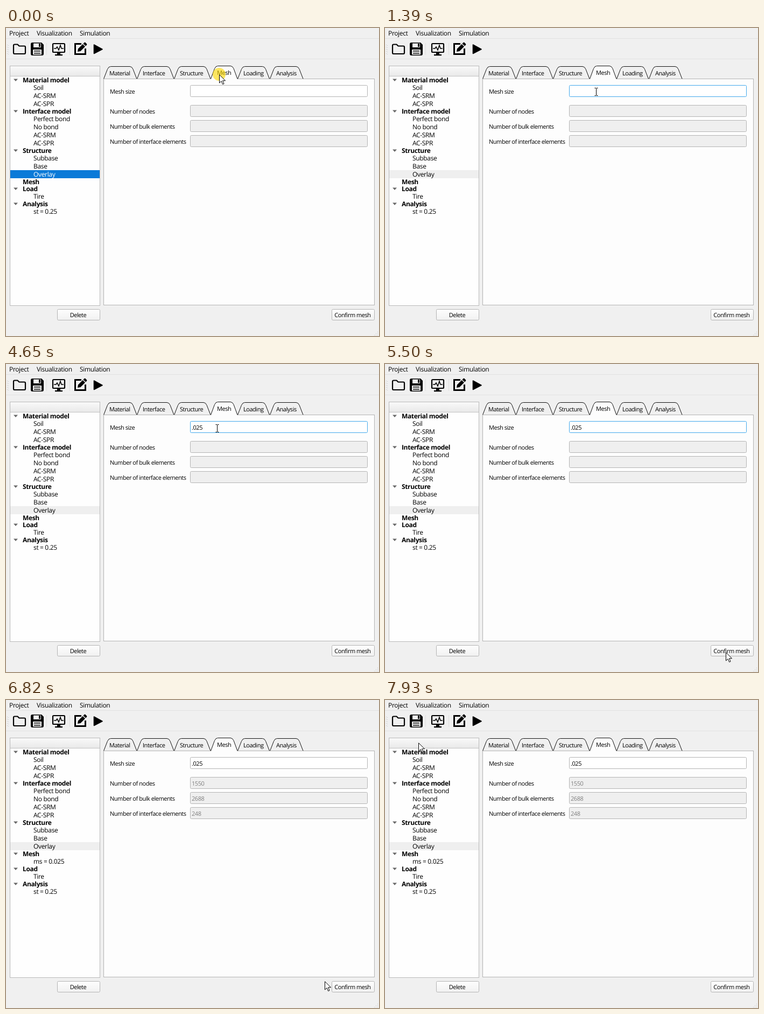
Write an HTML page that moves like this. It is 693x572 px and loops after 8 s.

```html
<!DOCTYPE html>
<html lang="en">
<head>
<meta charset="utf-8">
<title>Mesh settings</title>
<style>
  html, body { margin: 0; width: 100%; height: 100%; overflow: hidden; background: #f0f0f0; }
  svg { display: block; }
  text { font: 12px "Open Sans", "Noto Sans", sans-serif; letter-spacing: -.34px; text-rendering: geometricPrecision; white-space: pre; }
  .bold { font-weight: 700; letter-spacing: -.36px; }
  .form { font-size: 11px; letter-spacing: -.46px; }
  .mid { text-anchor: middle; }
  .off { fill: #808080; }
</style>
</head>
<body>
<svg id="stage" width="693" height="572" viewBox="0 0 693 572">
  <defs>
    <linearGradient id="face" x2="0" y2="1"><stop stop-color="#fefefe"/><stop offset="1" stop-color="#f1f1f1"/></linearGradient>
    <linearGradient id="head" x2="0" y2="1"><stop stop-color="#f9f9f9"/><stop offset="1" stop-color="#e9e9e9"/></linearGradient>
  </defs>
  <rect width="693" height="572" fill="#f0f0f0"/>
  <path d="M0 19.5H693M0 57.5H693" stroke="#e2e2e2"/>
  <path d="M75.5 28V50M118.5 28V50" stroke="#dedede"/>
  <path d="M2.5 31V49M4.5 32V50" stroke="#c4c4c4" stroke-dasharray="1 3"/>
  <path d="M684 570.5h7M687 567.5h4M690 564.5h1" stroke="#c6c6c6" stroke-dasharray="1 2"/>

  <g id="icons">
    <path d="M14 46V32.500Q14 30.500 16 30.500H21.500L24.500 33.500H34Q36 33.500 36 35.500V46Q36 48 34 48H16Q14 48 14 46Z" fill="none" stroke="#000" stroke-width="2.200"/>
    <path fill-rule="evenodd" d="M49 27H66L70 31V48Q70 51 67 51H49Q46 51 46 48V30Q46 27 49 27ZM51 28.500V36H65V28.500ZM50 40V49.500H66V40Z"/>
    <path d="M61 29h3v6h-3zM52 42h12v1.500H52zM52 46h12v1.500H52z"/>
    <rect x="87" y="29" width="22" height="16" rx="1.500" fill="none" stroke="#000" stroke-width="2.200"/>
    <path d="M95 46h6v3h4v2.200H91V49h4z"/>
    <path d="M89 38h4l2-3 3 6 3-9 2 6h4" fill="none" stroke="#000" stroke-width="1.600"/>
    <path d="M140 29.500H128.500V48.500H147.500V38" fill="none" stroke="#000" stroke-width="3"/>
    <path d="M133 44l1-5.500 8.500-8.500 4.500 4.500-8.500 8.500zM143.500 29l2-2q1-.8 2 0l2.500 2.500q.8 1 0 2l-2 2z"/>
    <path d="M163.500 31L179 39.500 163.500 47.500Z" stroke="#000" stroke-width="1.600" stroke-linejoin="round"/>
  </g>

  <rect x="7.500" y="70.500" width="167" height="445" fill="#fefefe" stroke="#b9b9b9"/>
  <rect x="8" y="71" width="166" height="18" fill="url(#head)"/>
  <path d="M8 89.500H174" stroke="#c2c2c2"/>
  <rect id="selection" x="8" y="264" width="166" height="15"/>
  <g id="tree"></g>
  <rect x="181.500" y="94.500" width="503" height="420" fill="#fdfdfd" stroke="#b3b3b3"/>
  <g id="form"></g>
  <rect id="caret" y="111" width="1" height="13"/>
  <circle id="halo" r="12" fill="#fbd800" fill-opacity=".62"/>
  <path id="arrow" d="M.5.8V16L4.100 12.700 6.600 18.500 9 17.500 6.500 11.800H11.500Z" fill="#fff" stroke="#000"/>
  <path id="beam" d="M-3 -6.500H-.5M.5 -6.500H3M0 -6V7M-3 7.500H-.5M.5 7.500H3" fill="none" stroke="#000"/>
</svg>
<script>
const LOOP = 8000, FOCUS = 850, CONFIRM = 5660, RESULT = 5890;
const $ = id => document.getElementById(id);

function add(parent, tag, attrs, content = "") {
  const el = document.createElementNS("http://www.w3.org/2000/svg", tag);
  for (const key in attrs) el.setAttribute(key, attrs[key]);
  el.textContent = content;
  return parent.appendChild(el);
}
const write = (parent, x, y, content, style = "") => add(parent, "text", { x, y, class: style }, content);
const show = (el, on) => el.setAttribute("visibility", on ? "visible" : "hidden");
const place = (el, x, y) => el.setAttribute("transform", `translate(${x} ${y})`);

// Menu bar
[[6, "Project"], [57, "Visualization"], [137, "Simulation"]]
  .forEach(([x, name]) => write($("stage"), x, 14, name));

// Model tree
const tree = $("tree");
function branch(parent, y, name, open = true) {
  write(parent, 31, y, name, "bold");
  return open && twist(parent, y);
}
const twist = (parent, y) => add(parent, "path", { d: `M14 ${y - 6.5}h8l-4 4.500z`, fill: "#686868" });
const leaf = (parent, y, name) => write(parent, 51, y, name);

branch(tree, 101, "Material model");
["Soil", "AC-SRM", "AC-SPR"].forEach((name, i) => leaf(tree, 115 + i * 15, name));
branch(tree, 159, "Interface model");
["Perfect bond", "No bond", "AC-SRM", "AC-SPR"].forEach((name, i) => leaf(tree, 173 + i * 15, name));
branch(tree, 232, "Structure");
const [, , overlay] = ["Subbase", "Base", "Overlay"].map((name, i) => leaf(tree, 246 + i * 15, name));
branch(tree, 290, "Mesh", false);
const meshChild = add(tree, "g", {});
twist(meshChild, 290);
leaf(meshChild, 304, "ms = 0.025");
const tail = add(tree, "g", {});
branch(tail, 303, "Load");
leaf(tail, 317, "Tire");
branch(tail, 331, "Analysis");
leaf(tail, 345, "st = 0.25");

// Tabs
const form = $("form");
function tab(left, right, textX, name, active) {
  const top = active ? 70.5 : 71.5, base = 94.5;
  add(form, "path", {
    d: `M${left} ${base}L${left + 7} ${top + 5}Q${left + 9} ${top} ${left + 13} ${top}` +
       `H${right - 13}Q${right - 9} ${top} ${right - 7} ${top + 5}L${right} ${base}`,
    fill: active ? "#fdfdfd" : "#f0f0f0", stroke: "#111"
  });
  if (active) add(form, "path", { d: `M${left + 1} ${base}H${right - 1}`, stroke: "#fdfdfd" });
  else add(form, "path", { d: `M${left} ${base}H${right}`, stroke: "#b3b3b3" });
  write(form, textX, active ? 87 : 88, name, "form");
}
tab(181.5, 243, 192, "Material");
tab(243.5, 312, 254, "Interface");
tab(312.5, 380, 323, "Structure");
tab(430.5, 489.5, 441, "Loading");
tab(490.5, 552, 502, "Analysis");
tab(380.5, 430, 392, "Mesh", true);

// Form rows
function field(y, label, enabled) {
  write(form, 193, y + 15, label, "form");
  const box = add(form, "rect", {
    x: 342.5, y: y - .5, width: 329, height: 21, rx: 2,
    fill: enabled ? "#fff" : "#efefef", stroke: "#b4b4b4"
  });
  return { box, value: write(form, 345, y + 15, "", enabled ? "form" : "form off") };
}
const size = field(107, "Mesh size", true);
const results = [["Number of nodes", "1550"], ["Number of bulk elements", "2688"], ["Number of interface elements", "248"]]
  .map(([label, total], i) => ({ ...field(144 + i * 28, label), total }));

function button(x, name) {
  const box = add(form, "rect", { x: x + .5, y: 522.5, width: 79, height: 20, rx: 2, fill: "url(#face)", stroke: "#b4b4b4" });
  write(form, x + 39, 537, name, "form mid");
  return box;
}
button(95, "Delete");
const confirm = button(605, "Confirm mesh");

// Each step holds until the next one: time, x, y
const pointer = [
  [0, 396, 86], [520, 395, 97], [605, 393, 113], [690, 392, 118],
  [4650, 392, 119], [4727, 398, 129], [4805, 425, 168], [4882, 482, 254], [4960, 552, 364],
  [5037, 616, 460], [5115, 655, 521], [5192, 665, 543], [5270, 637, 543], [5440, 635, 539], [5500, 633, 535],
  [6740, 625, 533], [6820, 592, 522], [6900, 528, 497], [6980, 432, 457], [7060, 329, 411],
  [7130, 245, 375], [7210, 187, 349], [7290, 146, 330], [7370, 111, 309], [7450, 85, 291], [7530, 71, 281],
  [7610, 60, 238], [7690, 54, 181], [7770, 55, 132], [7850, 58, 97], [7930, 62, 79]
];
// Start, end, centre of the click highlight
const clicks = [[0, 60, 396, 86], [FOCUS, 1010, 390, 117], [CONFIRM, RESULT, 634, 535]];
// Time, typed text
const typing = [[0, ""], [2250, "."], [2630, ".0"], [3410, ".02"], [3640, ".025"]];
// Time, caret x (0 while blinked off)
const blinks = [[0, 0], [FOCUS, 345], [1390, 0], [1940, 345], [2250, 349], [2630, 355], [3260, 0],
  [3410, 361], [3640, 367], [4250, 0], [4780, 367], [5270, 0]];

const current = (steps, t) => steps.findLast(step => step[0] <= t);

function draw(t) {
  const focused = t >= FOCUS && t < CONFIRM, done = t >= RESULT;

  const [, x, y] = current(pointer, t);
  const inField = x > 342 && x < 672 && y > 107 && y < 128;
  show($("arrow"), !inField);
  show($("beam"), inField);
  place($("arrow"), x, y);
  place($("beam"), x + .5, y);

  const click = clicks.find(([from, to]) => t >= from && t < to);
  show($("halo"), click);
  if (click) place($("halo"), click[2], click[3]);

  const caretX = current(blinks, t)[1];
  show($("caret"), caretX);
  $("caret").setAttribute("x", caretX);
  size.value.textContent = current(typing, t)[1];
  size.box.setAttribute("stroke", focused ? "#43a9ec" : "#b4b4b4");

  $("selection").setAttribute("fill", t < FOCUS ? "#0b7ad8" : "#efefef");
  overlay.setAttribute("fill", t < FOCUS ? "#fff" : "#000");
  confirm.setAttribute("fill", t >= CONFIRM && !done ? "#dedede" : "url(#face)");

  show(meshChild, done);
  place(tail, 0, done ? 15 : 0);
  results.forEach(({ value, total }) => value.textContent = done ? total : "");
}

const start = performance.now();
function tick() {
  draw((performance.now() - start) % LOOP);
  requestAnimationFrame(tick);
}
tick();
</script>
</body>
</html>
```
